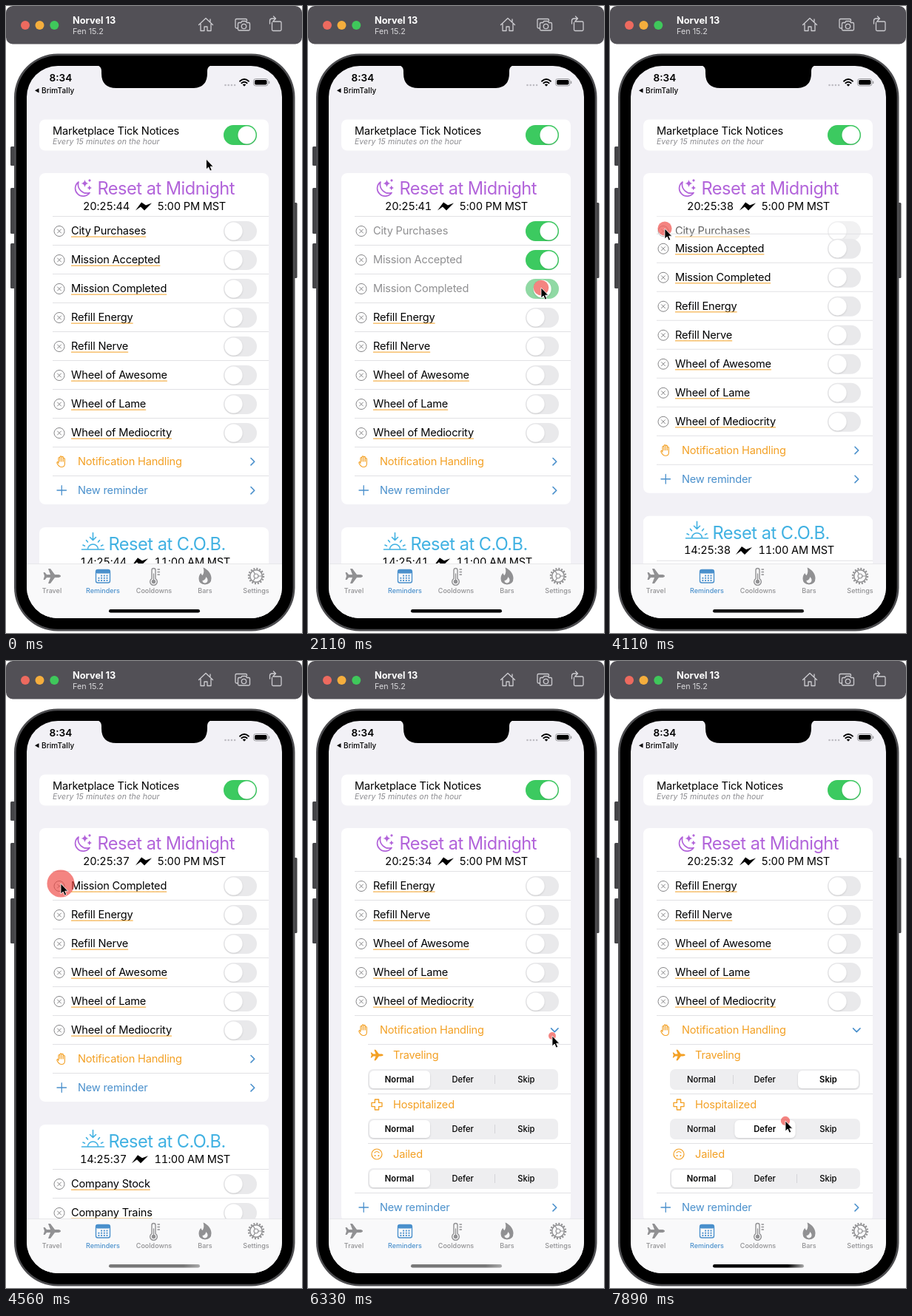
An HTML page for the animation above (8000 ms loop, 400 px wide and 848 px high).

```html
<!DOCTYPE html>
<html lang="en">
<head>
<meta charset="utf-8">
<title>Reminders</title>
<style>
html, body { margin: 0; width: 100%; height: 100%; overflow: hidden; background: #fff; }
svg { display: block; width: 100vw; height: 100vh; }
text { font-family: Inter, sans-serif; font-size: 14.6px; letter-spacing: -.013em; white-space: pre; }
.title { font-size: 23.6px; letter-spacing: -.5px; }
.clock { font-feature-settings: "tnum"; }
.tab { font-size: 9px; font-weight: 500; letter-spacing: 0; text-anchor: middle; }
.seg { font-size: 11.2px; font-weight: 500; letter-spacing: 0; text-anchor: middle; }
.line { fill: none; stroke-linecap: round; stroke-linejoin: round; }
</style>
</head>
<body>
<svg id="stage" viewBox="0 0 400 848"></svg>
<script>
const LOOP = 8000, FPS = 9, ROW = 39, PANEL = 201;
const ORANGE = '#f3a024', BLUE = '#4a90cc', GRAY = '#919193', PURPLE = '#b264da', SKY = '#40b1e2', PALE = '#cccbd0';

const rect = (x, y, w, h, r, fill, more = '') =>
  `<rect x="${x}" y="${y}" width="${w}" height="${h}" rx="${r}" fill="${fill}" ${more}/>`;
const text = (x, y, s, fill = '#000', more = '') => `<text x="${x}" y="${y}" fill="${fill}" ${more}>${s}</text>`;
const line = (d, color, w = 1.3, more = '') => `<path class="line" d="${d}" stroke="${color}" stroke-width="${w}" ${more}/>`;
const fill = (d, color) => `<path d="${d}" fill="${color}"/>`;
const dot = (x, y, r, color, more = '') => `<circle cx="${x}" cy="${y}" r="${r}" fill="${color}" ${more}/>`;
const ring = (x, y, r, color, w = 1, more = '') => dot(x, y, r, 'none', `stroke="${color}" stroke-width="${w}" ${more}`);
const at = (x, y, body, id = '') => `<g ${id && `id="${id}"`} transform="translate(${x} ${y})">${body}</g>`;
const divider = (y, x = 63) => rect(x, y, 355 - x, 1, 0, '#e1e1e4');

const toggle = (y, on = 0) => at(294, y - 13.5,
  rect(0, 0, 45, 27, 13.5, '#e9e9eb') +
  rect(0, 0, 45, 27, 13.5, '#3cca60', `class="green" opacity="${on}"`) +
  dot(on ? 31.5 : 13.5, 13.5, 12, '#fff', 'class="knob" filter="url(#soft)"'));

const row = (name, id) => at(0, 0,
  divider(0) + ring(72, 20.5, 7, '#858587') + line('M69.5 18l5 5m0-5l-5 5', '#858587', 1) +
  text(88, 25.4, name, '#000', 'class="name"') + rect(88, 27.6, 0, 1, 0, ORANGE, 'class="under"') + toggle(20.5), id);

const plane = 'M12 0C12-1.5 9.5-2 8-2H4L-2-10H-5L-2-2H-7L-9.5-5H-11.5L-10 0-11.5 5H-9.5L-7 2H-2L-5 10H-2L4 2H8C9.5 2 12 1.5 12 0Z';
const star = (x, y, r) => at(x, y, fill(`M0 ${-r}Q.6-.6 ${r} 0 .6.6 0 ${r}-.6.6 ${-r} 0-.6-.6 0 ${-r}Z`, PURPLE));
const bolt = (x, y) => at(x, y, fill('M0 6L8-5 14-1 22-4 12 6 7 1Z', '#000'));
const chevron = (more = '') => line('M331 15.5l4.7 4.7-4.7 4.7', BLUE, 1.6, more);
const face = ring(0, 0, 7, ORANGE, 1.2) + dot(-2.4, 2, 1, ORANGE) + dot(2.4, 2, 1, ORANGE) + line('M-3-2Q0-5 3-2', ORANGE, 1.1);
const cross = line('M-2.6-7H2.6V-2.6H7V2.6H2.6V7H-2.6V2.6H-7V-2.6H-2.6Z', ORANGE);
const hand = line('M-4.5 1V-4.5a1 1 0 0 1 2 0V-6a1 1 0 0 1 2.2 0V-5.5a1 1 0 0 1 2.2 0V-3.5a1 1 0 0 1 2 0V3Q4 7.5-.5 7.5-4 7.5-6.5 2.5-7 .5-5.5.5L-4.5 2.5M-2.5-4.5V0M-.3-6V0M1.9-5V0', ORANGE, 1.1);
const moon = line('M98 238A10.6 10.6 0 1 0 113 252.5 11.8 11.8 0 0 1 98 238Z', PURPLE, 1.7) + star(106.5, 240, 5.2) + star(112.8, 246, 3.2) + star(113, 236, 2.2);
const sunset = line('M102.5 30H132.5M110.5 30a7 7 0 0 1 14 0M104 24l2.5 1.2M131 24l-2.5 1.2M108.5 17.5l2 2.5M126.5 17.5l-2 2.5M117.5 7.5v9.5M113.5 13.5l4 4 4-4', SKY, 1.6);

const choices = ['Normal', 'Defer', 'Skip'];
const picker = (label, icon, i) => at(0, i * 67,
  at(93, 15, icon) + text(115, 20, label, ORANGE) + rect(81, 34, 257, 28, 7, '#eeeef0') +
  [166, 252].map(x => rect(x, 42, 1, 12, 0, '#d4d4d8', 'class="bar"')).join('') +
  rect(83, 36, 82, 24, 6, '#fff', 'class="pill" filter="url(#soft)"') +
  choices.map((c, k) => text(123.5 + k * 85.7, 52, c, '#000', 'class="seg"')).join('') +
  divider(67, i < 2 ? 81 : 63), 'picker' + i);

const rows = ['City Purchases', 'Mission Accepted', 'Mission Completed', 'Refill Energy', 'Refill Nerve',
  'Wheel of Awesome', 'Wheel of Lame', 'Wheel of Mediocrity'];
const lateRows = ['Company Stock', 'Company Trains', 'Job Points', 'Daily Bonus'];

const windowBar = rect(0, 0, 400, 51.5, 9, '#525056') +
  dot(26, 26, 6, '#ed6a5f') + dot(45.5, 26, 6, '#f5ae3d') + dot(65.3, 26, 6, '#3fc85b') +
  text(90, 24, 'Norvel 13', '#fff', 'style="font-size:12.8px;font-weight:700;letter-spacing:0"') +
  text(90, 38, 'Fen 15.2', '#d8d7da', 'style="font-size:10.8px;letter-spacing:0"') +
  line('M260.5 25.5L270 16.5l9.5 9M263 24v9.5h5V28h4v5.5h5V24M276 18v3', PALE) +
  line('M313 30h-1.5q-1.5 0-1.5-1.5V19q0-1.5 1.5-1.5H324q1.5 0 1.5 1.5v1M315 22.5h2.5l1.5-2h5l1.5 2h2.5q1.5 0 1.5 1.5v7.5q0 1.5-1.5 1.5H315q-1.5 0-1.5-1.5V24q0-1.5 1.5-1.5Z', PALE) +
  ring(321.5, 27.5, 3.2, PALE, 1.3) +
  line('M360.5 21H370.5q1.5 0 1.5 1.5V32q0 1.5-1.5 1.5H361q-1.5 0-1.5-1.5V22.5M356.5 24V20q0-3 3-3H364M361.5 14l3 3-3 3', PALE);

const phone = [[190, 26], [246, 62], [321, 61]].map(([y, h]) => rect(6, y, 6, h, 1.5, '#444447')).join('') +
  rect(388, 266, 5.5, 102, 1.5, '#444447') +
  rect(11, 64.5, 379.5, 781, 59, '#4c4c4f') + rect(13.8, 67.3, 373.9, 775.4, 56, '#000');

const status = fill('M122 80Q129 81 129 88V91Q129 111 149 111H252Q272 111 272 91V88Q272 81 279 80Z', '#000') +
  text(58.5, 101.5, '8:34', '#000', 'style="font-size:13.6px;font-weight:600;letter-spacing:0"') +
  fill('M39 114.3L44.5 111.2V117.4Z', '#000') +
  text(48, 117.7, 'BrimTally', '#000', 'style="font-size:10px;font-weight:500;letter-spacing:.01em"') +
  [0, 1, 2, 3].map(i => dot(296.5 + i * 4.2, 107, 1.3, '#bdbcc2')).join('') +
  line('M316 101.7Q322 96.3 328 101.7M318.4 104.3Q322 101 325.6 104.3', '#000', 1.9) + fill('M319.7 106.2Q322 104.6 324.3 106.2L322 108.8Z', '#000') +
  rect(334.5, 98.5, 19.5, 9.5, 3, 'none', 'stroke="#9b9b9f"') + rect(336, 100, 16.5, 6.5, 1.8, '#000') + rect(355, 101.5, 1.3, 3.5, .6, '#9b9b9f');

const days = [0, 1, 2].map(r => [0, 1, 2, 3].map(c => r + c ? rect(-6.6 + c * 3.7, -1.5 + r * 3.2, 2, 2, .4, BLUE) : '').join('')).join('');
const tabs = [
  ['Travel', 62, fill(plane, GRAY)],
  ['Reminders', 131, rect(-9.5, -8.5, 19, 17.5, 2.5, 'none', `stroke="${BLUE}" stroke-width="1.4"`) + rect(-9.5, -8.5, 19, 5, 2, BLUE) + days],
  ['Cooldowns', 200, line('M-3 3.5V-8a2.5 2.5 0 0 1 5 0V3.5a4.8 4.8 0 1 1-5 0Z', GRAY, 1.4) + dot(-.5, 7.5, 2.7, GRAY) + line('M-.5-3V6M5-9h2.5M5-5.5h2.5M5-2h2.5', GRAY)],
  ['Bars', 269, fill('M-2.5-11.5C4-9 8.5-3 8.5 3Q8.5 11 0 11.5-8.5 11-8.5 3.5-8.5-1.5-5.5-4-5-1.5-3.3-1-.5-5-2.5-11.5Z', GRAY) + fill('M1.5 1Q4 4 3.5 6.5 2.5 9.5-.5 9.5-3.5 9-3.5 6 0 6 1.5 1Z', '#f8f8f9')],
  ['Settings', 338, ring(0, 0, 10, GRAY, 2.4, 'stroke-dasharray="2 1.927"') + ring(0, 0, 8.3, GRAY, 1.5) + ring(0, 0, 3, GRAY, 1.2) + line('M3 0H8M-1.5-2.6L-4-7M-1.5 2.6L-4 7', GRAY, 1.2)]
].map(([name, x, icon]) => at(x, 771, icon) + text(x, 794, name, name === 'Reminders' ? BLUE : GRAY, 'class="tab"')).join('');

const header = moon + text(123.5, 255.3, 'Reset at Midnight', PURPLE, 'class="title"') +
  text(104, 276, '', '#000', 'class="clock" id="clockA"') + bolt(175, 270.5) + text(204.5, 276, '5:00 PM MST', '#000', 'class="clock"');

const handling = divider(0) + at(75.5, 20, hand) + text(97, 25.3, 'Notification Handling', ORANGE) + chevron('id="chevron"');

const adding = divider(0) + line('M69 20h12.5M75.25 13.75v12.5', BLUE) + text(97, 25.3, 'New reminder', BLUE) + chevron();

const lateCard = rect(45, 0, 310, 330, 8, '#fff') + sunset + text(138.5, 31.3, 'Reset at C.O.B.', SKY, 'class="title"') +
  text(100, 51.7, '', '#000', 'class="clock" id="clockB"') + bolt(170, 46.3) + text(200.5, 51.7, '11:00 AM MST', '#000', 'class="clock"') +
  lateRows.map((name, i) => at(0, 60 + i * ROW, row(name, 'late' + i))).join('');

const panel = `<g clip-path="url(#reveal)">` +
  [['Traveling', `<g transform="scale(.72)">${fill(plane, ORANGE)}</g>`], ['Hospitalized', cross], ['Jailed', face]]
    .map(([label, icon], i) => picker(label, icon, i)).join('') + divider(0, 81) + '</g>';

const stage = document.getElementById('stage');
stage.innerHTML = `<defs>
  <clipPath id="screen">${rect(28, 81, 345, 747, 42, '#000')}</clipPath>
  <clipPath id="reveal"><rect id="revealBox" x="45" y="0" width="310" height="0"/></clipPath>
  <filter id="soft" x="-20%" y="-20%" width="140%" height="150%"><feDropShadow dx="0" dy="1" stdDeviation="1" flood-opacity=".16"/></filter>
  <linearGradient id="shade"><stop class="stop"/><stop class="stop" offset=".82"/><stop class="stop" offset="1"/></linearGradient>
  </defs>` + windowBar + phone + `<g clip-path="url(#screen)">` +
  rect(28, 81, 345, 747, 0, '#f2f1f6') + rect(45, 153.5, 310, 42, 8, '#fff') +
  text(63, 173.5, 'Marketplace Tick Notices') +
  text(63, 187, 'Every 15 minutes on the hour', '#8c8c90', 'style="font-size:10.6px;font-style:italic;letter-spacing:0"') + toggle(174.5, 1) +
  rect(45, 226, 310, 448, 8, '#fff', 'id="card"') + header +
  rows.map((name, i) => row(name, 'row' + i)).join('') + at(0, 0, handling, 'handling') +
  at(0, 0, panel, 'panel') + at(0, 0, adding, 'adding') + at(0, 0, lateCard, 'late') +
  rect(28, 754, 345, 75, 0, '#f9f9fa') + rect(28, 754, 345, .6, 0, '#dddde0') + tabs +
  rect(139, 816, 123, 4.6, 2.3, 'url(#shade)') + status + '</g>' +
  dot(0, 0, 0, '#ef4540', 'id="tap" opacity=".66"') +
  at(0, 0, `<path d="M0 0V14L3.2 11 5.3 16 7.7 15 5.6 10.2H9.7Z" stroke="#fff" stroke-width=".8"/>`, 'cursor');

const $ = id => document.getElementById(id);
const set = (el, attr, value) => el.setAttribute(attr, value);
const move = (el, y, x = 0) => set(el, 'transform', `translate(${x} ${y})`);
for (const name of stage.querySelectorAll('.name')) {
  set(name.nextElementSibling, 'width', name.getComputedTextLength());
}

// Timeline, in ms
const path = [[0, 270.5, 207], [200, 270.5, 207], [830, 328, 303], [1060, 328, 304], [1400, 320, 342], [1560, 319, 343],
  [1900, 315, 381], [2440, 315, 381], [2620, 316, 343], [2740, 316, 343], [2940, 317, 304], [3110, 317, 304],
  [3600, 74, 301], [4640, 74, 301], [5100, 87, 516], [5410, 87, 516], [6010, 330, 507], [6340, 330, 507],
  [6920, 295, 566], [7120, 295, 566], [7620, 237, 622], [8000, 237, 622]];
const taps = [1000, 1500, 2000, 2360, 2690, 3020, 3990, 4270, 4555, 6150, 7000, 7722];
const switches = [[1010, 3030], [1510, 2700], [2010, 2370]];
const removals = [4030, 4310, 4620];
const picks = [[7030, 2], [7740, 1]];

const clamp = p => Math.min(1, Math.max(0, p));
const ease = p => p * p * (3 - 2 * p);
const progress = (t, start, length) => ease(clamp((t - start) / length));

function cursorAt(t) {
  const i = Math.max(1, path.findIndex(p => p[0] > t));
  const [t0, x0, y0] = path[i - 1], [t1, x1, y1] = path[i];
  const p = progress(t, t0, t1 - t0);
  return [x0 + (x1 - x0) * p, y0 + (y1 - y0) * p];
}

const tapSize = t => 18.6 * Math.max(...taps.map(p => clamp(1 - (t < p ? (p - t) / 150 : (t - p) / 250))));

function drawRows(t) {
  let gone = 0;
  rows.forEach((_, i) => {
    const el = $('row' + i), removed = i < 3 ? progress(t, removals[i], 190) : 0;
    move(el, 284 + ROW * (i - gone));
    set(el, 'opacity', 1 - removed);
    gone += removed;
    if (i > 2) return;
    const [on, off] = switches[i];
    const p = progress(t, on, 200) - progress(t, off, 200);
    const active = t > on + 50 && t < off + 50;
    set(el.querySelector('.green'), 'opacity', p);
    set(el.querySelector('.knob'), 'cx', 13.5 + 18 * p);
    set(el.querySelector('.name'), 'fill', active ? '#8f8f91' : '#000');
    set(el.querySelector('.under'), 'opacity', active ? 0 : 1);
  });
  return gone * ROW;
}

function drawPicker(i, t) {
  const el = $('picker' + i), [start, choice] = picks[i] || [LOOP, 0];
  const place = choice * progress(t, start, 140), chosen = Math.round(place);
  set(el.querySelector('.pill'), 'x', 83 + 85.5 * place);
  el.querySelectorAll('.seg').forEach((s, k) => s.style.fontWeight = k === chosen ? 600 : 500);
  el.querySelectorAll('.bar').forEach((b, k) => set(b, 'opacity', chosen === k || chosen === k + 1 ? 0 : 1));
}

function draw(t) {
  const seconds = 44 - Math.floor(t / 640 + .3);
  $('clockA').textContent = '20:25:' + seconds;
  $('clockB').textContent = '14:25:' + seconds;

  const gone = drawRows(t), open = progress(t, 6160, 160), grow = PANEL * open;
  move($('handling'), 596 - gone);
  move($('panel'), 635 - gone);
  set($('revealBox'), 'height', grow);
  set($('panel'), 'opacity', open);
  move($('adding'), 635 - gone + grow);
  move($('late'), 705 - gone + grow);
  set($('card'), 'height', 448 - gone + grow);
  set($('chevron'), 'transform', `rotate(${90 * open} 333.3 20.2)`);
  for (let i = 0; i < 3; i++) drawPicker(i, t);

  const dim = progress(t, 4050, 250), dark = progress(t, 6700, 250);
  stage.querySelectorAll('.stop').forEach((s, i) => {
    const v = Math.round(i < 2 ? 120 * (dim - dark) : 170 * dim);
    set(s, 'stop-color', `rgb(${v},${v},${v})`);
  });

  const [x, y] = cursorAt(t);
  move($('cursor'), y, x);
  move($('tap'), y, x);
  set($('tap'), 'r', tapSize(t));
}

const begin = performance.now();
function tick() {
  const t = (performance.now() - begin) % LOOP;
  draw(Math.floor(t * FPS / 1000 + .05) * 1000 / FPS % LOOP);
  requestAnimationFrame(tick);
}
tick();
</script>
</body>
</html>
```
